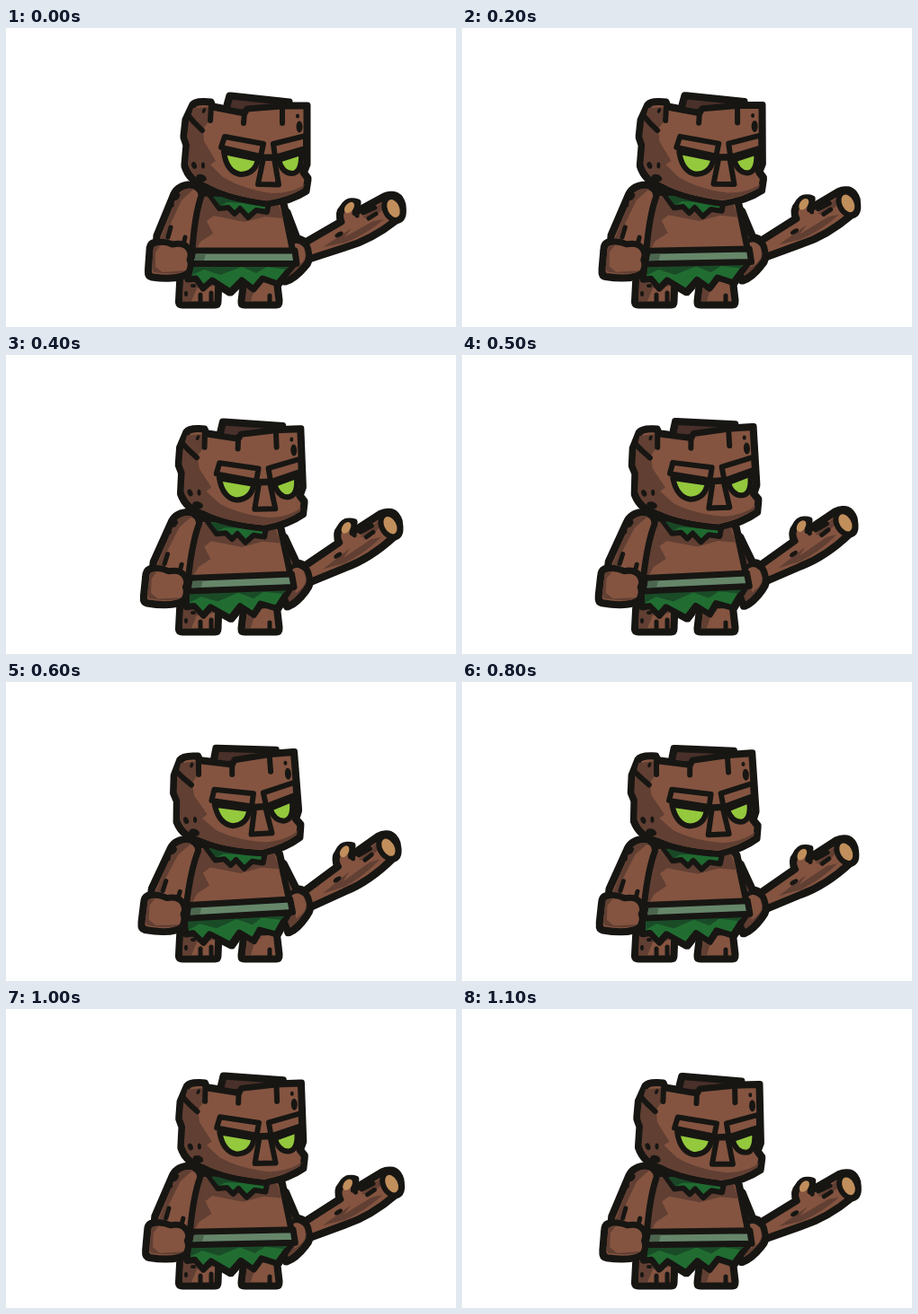
Write an HTML page that moves like this. It is 500 by 333 pixels and loops after 1200 ms.

```html
<!DOCTYPE html>
<html lang="en">
<head>
<meta charset="utf-8">
<title>Stump creature idle</title>
<style>
  html, body { margin: 0; width: 100%; height: 100%; overflow: hidden; background: #fff; }
  svg { display: block; width: 100vw; height: 100vh; }
  .o { stroke: #171613; stroke-width: 7; }
  .t { stroke: #171613; stroke-width: 6; }
  .l { fill: none; stroke: #171613; stroke-width: 5; }
  .k { fill: #171613; }
  .skin { fill: #845440; }
  .dark { fill: #613f33; }
</style>
</head>
<body>
<svg viewBox="0 0 500 333" stroke-linejoin="round" stroke-linecap="round">
  <!-- Thickens only the outer contour of the whole figure. -->
  <filter id="contour" x="0" y="0" width="500" height="333" filterUnits="userSpaceOnUse" color-interpolation-filters="sRGB">
    <feMorphology in="SourceAlpha" operator="dilate" radius="1" result="grown"/>
    <feFlood flood-color="#171613"/>
    <feComposite in2="grown" operator="in" result="edge"/>
    <feMerge><feMergeNode in="edge"/><feMergeNode in="SourceGraphic"/></feMerge>
  </filter>
  <g filter="url(#contour)">
    <g id="club">
      <path class="o skin" d="M330 241L373 216Q369 207 375 201Q381 191 390 195L388 206L421 188Q436 182 440 198Q441 208 434 213Q405 236 376 244L336 257Z"/>
      <path class="dark" d="M352 244L384 223L376 233L408 215L420 213Q400 230 377 239ZM396 211L417 195L419 202L406 213Z"/>
      <ellipse cx="381.500" cy="200" rx="4.500" ry="7" transform="rotate(38 381.500 200)" fill="#c18f5b"/>
      <path class="l" d="M389 202L390 209"/>
      <path class="l" d="M397 206L410 200M403 212L411 207"/>
      <ellipse class="k" cx="370" cy="230" rx="5" ry="2.500" transform="rotate(-28 370 230)"/>
      <ellipse class="t" cx="430.500" cy="201" rx="9.500" ry="13.500" transform="rotate(-24 430.500 201)" fill="#c18f5b"/>
    </g>

    <g id="farArm">
      <path class="o dark" d="M306 200L312 206L323 235Q334 237 336 248Q339 258 331 266Q320 279 310 282L304 262Z"/>
      <path class="skin" d="M318 240Q331 238 332 250Q334 258 326 264L320 268Z"/>
      <path class="l" d="M316 240Q324 234 331 241"/>
    </g>

    <g id="legs">
      <path class="o skin" d="M194 276L192.500 305Q193 308 197 308H231Q235 308 235 304L236 278Z"/>
      <path class="dark" d="M197 280H232V287L212 290L206 304H196Z"/>
      <path class="o skin" d="M265 280L262 305Q262 308 266 308H299Q303 308 303 304L300 278Z"/>
      <path class="dark" d="M268 284H284L276 291L272 304H266Z"/>
      <path class="l" d="M216 297V305M228 295V305M293 298V305"/>
      <ellipse class="k" cx="208" cy="287" rx="3" ry="2"/>
      <ellipse class="k" cx="200" cy="296" rx="2" ry="3"/>
    </g>

    <g id="torso">
      <path class="o skin" d="M216 184L205 255H320L308 196L300 185Z"/>
      <path class="dark" d="M218 188H300L308 212L288 210L265 216L231 209L223 215L230 229L216 238L211 247H207Z"/>
      <path class="t" fill="#1f6a30" d="M225 184L237 201L247 200L254 207L260 201L269 211L278 203L290 205L293 190Z"/>
      <path fill="#194726" d="M230 188H290L289 196L266 195L246 194L238 198Z"/>
    </g>

    <g id="skirt">
      <path class="o" fill="#216d31" d="M206 260L202 280L211 279L219 290L229 281L249 294L262 281L275 291L285 279L302 285L321 262Z"/>
      <path fill="#1a4b27" d="M209 265H316L311 269L290 266L278 273L262 266L238 275L220 269L207 275Z"/>
    </g>

    <g id="belt">
      <path class="o" fill="#66866a" d="M208 248H321L323 262.500H205Z"/>
      <path fill="#4c654f" d="M211 251.500H222L220 259H209Z"/>
    </g>

    <g id="nearArm">
      <path class="o skin" d="M186 188Q190 177 203 175Q217 176 217 187Q210 207 207 246H167L168 232Z"/>
      <path class="dark" d="M190 186Q197 177 209 179L195 192L181 222L178 237H171Z"/>
      <path class="o skin" d="M164 240Q174 236 185 241Q198 238 203 246Q207 252 204 258Q207 264 203 272Q192 281 163 277Q158 276 158.500 270L160 249Q160 242 164 240Z"/>
      <path class="dark" d="M164 244L172 242L166 250L166 266L174 272L200 270Q190 276 164 272L162 268Z"/>
      <path class="l" d="M183 222L180 233M199 233L197 242"/>
      <ellipse class="k" cx="190" cy="188" rx="2.500" ry="4.500" transform="rotate(35 190 188)"/>
      <ellipse class="k" cx="185" cy="197" rx="1.800" ry="2.500"/>
    </g>

    <g id="head">
      <path class="o" fill="#49302a" d="M243 94L248 76L313 83V94Z"/>
      <path class="o skin" d="M207 86Q211 81 226 83L228 88L264 95L267 90L305 87H333V151L329 161L334 168L332 181Q315 192 289 196Q245 190 222 177Q203 170 198 153L200 130L197 121L199 103Z"/>
      <path class="dark" d="M207 89L224 88L225 103L218 112L219 126L232 148L226 152L240 166Q261 179 294 184Q318 184 331 174L329 179Q313 188 289 192Q247 187 224 174Q206 167 201 151L203 130L200 121L202 104Z"/>
      <path class="t" fill="none" d="M227 87L226 103M264 93L263 106M306 89L306 106M202 98L208 105L217 114"/>
      <path class="t" fill="#94c83d" d="M241 138L279 146Q276 163 259 163Q244 160 241 138Z"/>
      <path class="t" fill="#94c83d" d="M302 147L327 139Q328 161 317 162Q306 162 302 147Z"/>
      <path class="t skin" d="M285 145H297L302 174.500L279 174Z"/>
      <path class="t skin" d="M242 121L285 129L282 143L238 133Z"/>
      <path class="t skin" d="M296 129L332 120V134L298 144Z"/>
      <path class="l" d="M282 143H298"/>
      <g class="k">
        <ellipse cx="208" cy="153" rx="2.800" ry="4" transform="rotate(-20 208 153)"/>
        <ellipse cx="218" cy="153" rx="2" ry="3.500"/>
        <ellipse cx="216" cy="167" rx="6" ry="4" transform="rotate(20 216 167)"/>
        <ellipse cx="325" cy="110" rx="3.500" ry="6.500"/>
        <ellipse cx="323" cy="98" rx="2" ry="2.500"/>
        <ellipse cx="219" cy="92" rx="1.800" ry="3" transform="rotate(25 219 92)"/>
      </g>
    </g>
  </g>
</svg>
<script>
const STEP = 100;
// Lean amount per step: the body moves evenly, the head lags behind it.
const bodyLean = [0, .16, .33, .5, .67, .84, 1, .85, .7, .54, .38, .22];
const headLean = [0, .01, .07, .27, .5, .76, 1, .95, .85, .65, .46, .28];

const pose = (id, transform) =>
  document.getElementById(id).setAttribute('transform', transform);
const turn = (angle, x, y) => `rotate(${angle} ${x} ${y})`;

function draw(time) {
  const step = Math.floor(time / STEP) % bodyLean.length;
  const body = bodyLean[step];
  const head = headLean[step];
  const shear = .25 * body;
  const tilt = -.05 * body;

  pose('head', 'translate(1 0) ' + turn(-4.5 * head, 219, 267));
  pose('club', turn(-6.5 * body, 280, 242));
  pose('farArm', turn(-6 * body, 280, 242));
  pose('nearArm', turn(2.8 * body, 190, 116));
  pose('torso', `translate(${-4 * body} ${-3 * body}) ` + turn(-body, 260, 225));
  pose('belt', `translate(${-5 * body} 0) ` + turn(-3.3 * body, 218, 250));
  pose('skirt', `matrix(1 ${tilt} ${shear} 1 ${-290 * shear} ${-225 * tilt})`);
}

function tick() {
  draw(performance.now());
  requestAnimationFrame(tick);
}
tick();
</script>
</body>
</html>
```
